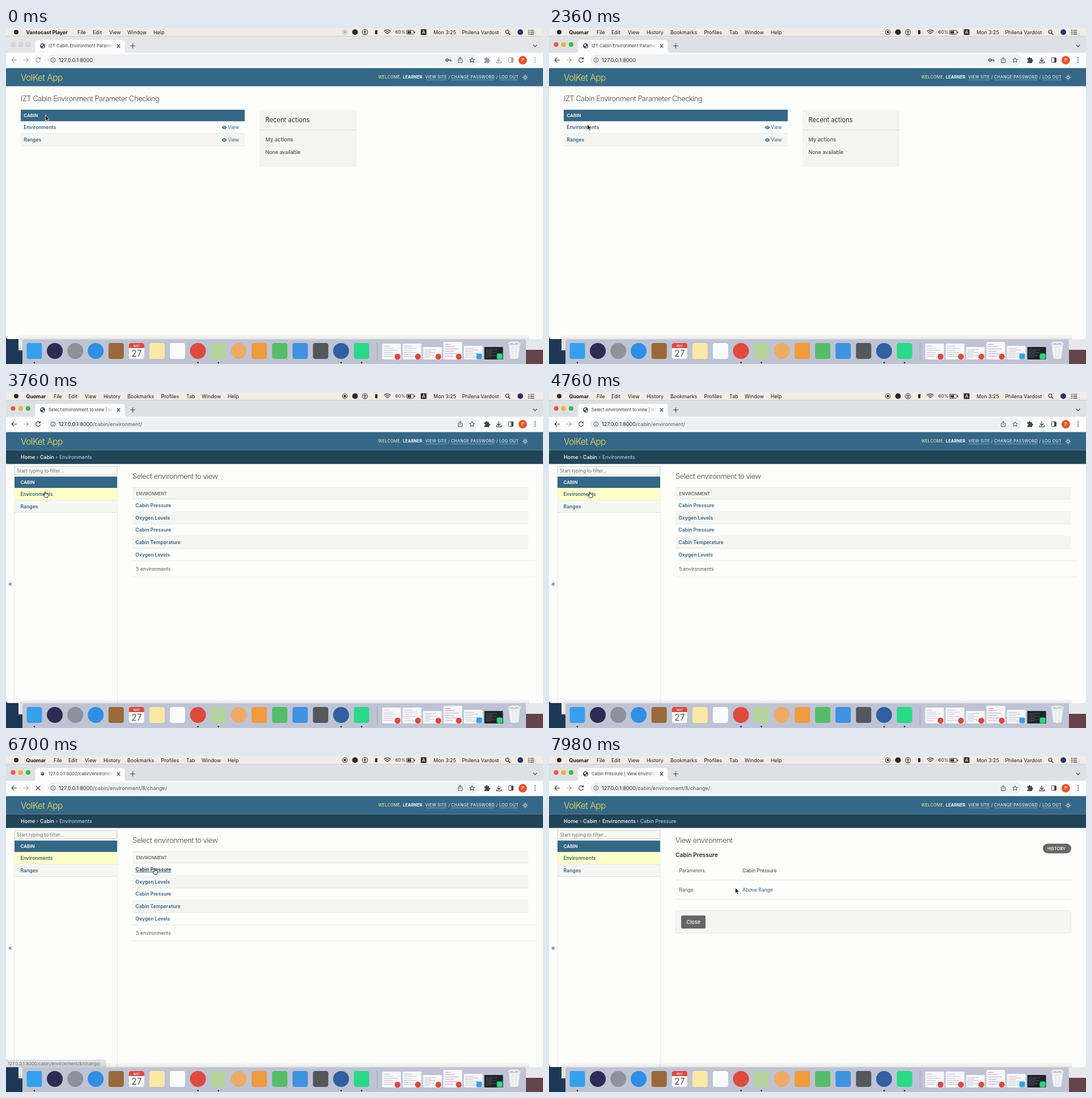
Recreate the animation shown at these times as an HTML page. Size 947 by 592 pixels, loop 8000 ms.

```html
<!DOCTYPE html>
<html lang="en">
<head>
<meta charset="utf-8">
<title>Cabin admin</title>
<style>
html, body { margin: 0; width: 100%; height: 100%; overflow: hidden; }
svg { display: block; width: 100vw; height: 100vh; font-family: Inter, Roboto, sans-serif; }
text { white-space: pre; }
</style>
</head>
<body>
<svg id="stage" viewBox="0 0 947 592"></svg>
<script>
const LOOP = 8000;
const MENU = 1250, FOCUS = 1600;                    // application, then window, comes to the front
const HOVER_LIST = 2600, CLICK_LIST = 2900, LIST = 3350;
const HOVER_ITEM = 5660, CLICK_ITEM = 6450, DETAIL = 7000;
const BLUE = '#356887', LINK = '#34627f', INK = '#333', RULE = '#e4e5e3', PALE = '#f5f6f4';

const rect = (x, y, w, h, fill, r = 0, extra = '') =>
  `<rect x="${x}" y="${y}" width="${w}" height="${h}" fill="${fill}" rx="${r}" ${extra}/>`;
const dot = (x, y, r, fill, extra = '') => `<circle cx="${x}" cy="${y}" r="${r}" fill="${fill}" ${extra}/>`;
const line = (d, color, w = 1) =>
  `<path d="${d}" fill="none" stroke="${color}" stroke-width="${w}" stroke-linecap="round" stroke-linejoin="round"/>`;
// y is the middle of the capitals
const text = (x, y, str, size, fill = INK, weight = 400, spacing = 0, extra = '') =>
  `<text x="${x}" y="${y + size * .36}" font-size="${size}" fill="${fill}" font-weight="${weight}" letter-spacing="${spacing}" ${extra}>${str}</text>`;
const during = (from, to, ...parts) => `<g data-from="${from}" data-to="${to}">${parts.join('')}</g>`;

function menuItems(app, items) {
  return text(35.5, 7.5, app, 8.9, '#1c1c1c', 700) +
    items.map(([x, label]) => text(x, 7.5, label, 8.9, '#1c1c1c')).join('');
}

function recordIcon(c) {
  return dot(597.5, 7.3, 4.3, 'none', `stroke="${c}" stroke-width="1"`) + rect(595.5, 5.3, 4, 4, c, .6);
}

function menuBar() {
  const c = '#2a2a2a';
  return rect(0, 0, 947, 15, '#f0ece8') + rect(0, 14.2, 947, .8, '#cbc9c8') +
    dot(18, 7.3, 4, c) +
    during(0, MENU, recordIcon('#aaa'), menuItems('Vantocast Player',
      [[126, 'File'], [153, 'Edit'], [182, 'View'], [214, 'Window'], [260, 'Help']])) +
    during(MENU, LOOP, recordIcon(c), menuItems('Quomar',
      [[84, 'File'], [110, 'Edit'], [139, 'View'], [172, 'History'], [214, 'Bookmarks'],
       [273.5, 'Profiles'], [318, 'Tab'], [345, 'Window'], [391, 'Help']])) +
    dot(615.5, 7.3, 5, c) +
    dot(633, 7.3, 4.7, 'none', `stroke="${c}"`) + dot(633, 4.8, .9, c) +
    line('M630.5 6.6h5M633 6.6v2l-1.5 2.4M633 8.6l1.5 2.4', c, .9) +
    rect(651, 4, 4, 7, c) +
    line('M667 5.6Q672.5 1 678 5.6M669 7.8Q672.5 4.8 676 7.8M671 9.8Q672.5 8.6 674 9.8', c, 1.3) +
    text(686.5, 7.5, '60%', 8.1, c) +
    rect(706.5, 4, 12.5, 7, 'none', 1.5, `stroke="${c}" stroke-width=".9"`) + rect(708, 5.5, 6, 4, c) +
    rect(720, 6, 1.3, 3, c) + line('M714 4.5L711.5 8h3L712 10.8', c, .9) +
    rect(731.5, 2.3, 10, 10, c, 1) + text(733.7, 7.5, 'A', 8, '#fff', 500) +
    text(754, 7.5, 'Mon 3:25', 8.9, '#1c1c1c') + text(804.5, 7.5, 'Philena Vardost', 8.8, '#1c1c1c') +
    dot(884, 6.5, 3, 'none', `stroke="${c}" stroke-width="1.1"`) + line('M886.4 8.9L889 11.6', c, 1.2) +
    dot(907, 7.3, 5, '#31336b') +
    line('M921 4h2M921 7.3h2M921 10.6h2M925 4h6M925 7.3h6M925 10.6h6', c, 1.2);
}

function trafficLights(colors) {
  return colors.map((c, i) => dot(12.5 + i * 13.2, 29, 4, c, 'stroke="#0002" stroke-width=".5"')).join('');
}

const reload = c => line('M60 54.2A4 4 0 1 0 60.4 57.8M60.4 52v2.6h-2.6', c, 1.2);
const stop = () => line('M53 53l7 7M60 53l-7 7', '#404348', 1.3);

function toolbarIcons(c) {
  return line('M18.5 56.5h-8.2M14 52.6l-3.9 3.9 3.9 3.9', c, 1.2) +
    `<path d="M843.5 53.3h2.5q0-2 1.6-2t1.6 2h2.8v2.8q2 0 2 1.5t-2 1.5v2.6h-8.5v-2.6q2 0 2-1.5t-2-1.5z" fill="${c}"/>` +
    line('M869 52v6.5M866 56l3 3 3-3M865 59v2.4h8.4V59', c, 1.2) +
    rect(886.3, 52.5, 8, 8, 'none', .8, `stroke="${c}" stroke-width="1"`) + rect(891, 52.5, 3.5, 8, c) +
    [52.7, 56.5, 60.3].map(y => dot(933, y, 1, c)).join('');
}

const tabTitle = str => text(75, 31.5, str, 7.7, '#3b3d42', 400, 0, 'clip-path="url(#tabClip)"');
const readyTab = str => dot(64.5, 31.5, 4.5, '#4a4d52') +
  '<path d="M61.5 30l2-1.6 2 1-1 2-1.8.6zM64.6 33l2-1 1 1-2 2z" fill="#fff"/>' + tabTitle(str);
const loadingTab = () => dot(64.5, 31.5, 3, '#55585d') + line('M62.4 30.2l2 1.2 1.6-1', '#fff', .8) +
  tabTitle('127.0.0.1:8000/cabin/environment');
const address = path => text(93, 56.6, `127.0.0.1:8000<tspan fill="#55585d">${path}</tspan>`, 9.1, '#26282c');

function browser() {
  const active = '#404348', idle = '#9b9da1';
  return rect(0, 15, 947, 30, '#dde1e5') +
    during(0, FOCUS, rect(0, 15, 947, 29, '#e4e6e9'), trafficLights(['#d5d7da', '#d5d7da', '#d5d7da'])) +
    during(FOCUS, LOOP, trafficLights(['#f4574e', '#f5b52e', '#35c13f'])) +
    '<path d="M46 44q5.5 0 5.5-5.5V26q0-5 5-5h148q5 0 5 5v12.5q0 5.5 5.5 5.5z" fill="#fcfcfc"/>' +
    rect(0, 43.5, 947, 27.5, '#fcfcfc') +
    during(0, CLICK_LIST, readyTab('IZT Cabin Environment Parameter')) +
    during(CLICK_LIST, LIST, loadingTab()) +
    during(LIST, CLICK_ITEM, readyTab('Select environment to view | VolKet')) +
    during(CLICK_ITEM, DETAIL, loadingTab()) +
    during(DETAIL, LOOP, readyTab('Cabin Pressure | View environment')) +
    rect(174, 25, 16, 13, 'url(#tabFade)') +
    line('M196 29l5 5M201 29l-5 5', '#44474c', 1.1) +
    line('M219.5 31.5h8M223.5 27.5v8', '#44474c', 1.1) +
    line('M930 30l3 3 3-3', '#44474c', 1.2) +
    during(0, FOCUS, toolbarIcons(idle), reload(idle)) +
    during(FOCUS, LOOP, toolbarIcons(active)) +
    during(FOCUS, CLICK_LIST, reload(active)) + during(CLICK_LIST, LIST, stop()) +
    during(LIST, CLICK_ITEM, reload(active)) + during(CLICK_ITEM, DETAIL, stop()) +
    during(DETAIL, LOOP, reload(active)) +
    line('M31 56.5h8.2M35.5 52.6l3.9 3.9-3.9 3.9', '#a4a6aa', 1.2) +
    rect(73, 46.5, 760, 20, '#eff0f2', 10) +
    dot(83, 56.5, 4, 'none', 'stroke="#505358" stroke-width="1"') + rect(82.5, 55.8, 1, 3, '#505358') + rect(82.5, 54, 1, 1, '#505358') +
    during(0, LIST, dot(777.7, 56.5, 2, 'none', `stroke="${active}" stroke-width="1.5"`),
      line('M780 56.5h4.5v1.7', active, 1.5)) +
    during(0, CLICK_LIST, address('')) +
    during(CLICK_LIST, CLICK_ITEM, address('/cabin/environment/')) +
    during(CLICK_ITEM, LOOP, address('/cabin/environment/8/change/')) +
    line('M799 55h-1.5v6h7v-6H803M801 58v-6M799 53.7l2-2 2 2', '#505358', 1) +
    '<path d="M822 52.2l1.3 2.9 3.2.3-2.4 2.1.7 3.1-2.8-1.6-2.8 1.6.7-3.1-2.4-2.1 3.2-.3z" fill="none" stroke="#505358"/>' +
    dot(911.3, 56.7, 7.5, '#e5562b') + text(908.9, 56.7, 'P', 7.5, '#fff');
}

function header() {
  const item = (x, str, w) => text(x, 86.5, str, 7.1, '#fff', 400, .3) + (w ? rect(x, 91, w, .6, '#a9c3d1') : '');
  const rays = Array.from({ length: 8 }, (_, i) => {
    const c = Math.cos(i * Math.PI / 4), s = Math.sin(i * Math.PI / 4);
    return `M${915.5 + 3.6 * c} ${87 + 3.6 * s}L${915.5 + 4.5 * c} ${87 + 4.5 * s}`;
  }).join('');
  return rect(0, 70.6, 947, 32, BLUE) +
    text(26, 87.3, 'VolKet App', 15.6, '#f3df58', 300, -.55) +
    text(656.5, 86.5, 'WELCOME,', 7.1, '#fbf3b4', 400, .3) + text(700, 86.5, 'LEARNER', 7.1, '#fff', 700, .2) +
    item(735, '.') + item(739.5, 'VIEW SITE', 38) + item(780, '/') + item(785, 'CHANGE PASSWORD', 77) +
    item(864.5, '/') + item(870, 'LOG OUT', 34) +
    dot(915.5, 87, 2.1, 'none', 'stroke="#fff" stroke-width="1"') + line(rays, '#fff', .9);
}

const title = (x, y, str) => text(x, y, str, 12.8, '#444', 300, -.4);
const bold = (x, y, str, color = LINK) => text(x, y, str, 8.6, color, 600);
const linkHint = (width, path) =>
  `<path d="M0 535.5h${width - 3}q3 0 3 3V548H0z" fill="#e0e2e6" stroke="#c8cace" stroke-width=".7"/>` +
  text(3, 541.8, '127.0.0.1:8000' + path, 7.8, '#666a70');

function home() {
  const view = y => `<path d="M380.5 ${y}q4.5-6 9 0q-4.5 6-9 0z" fill="#286394"/>` +
    dot(385, y, 1.7, '#fff') + dot(385, y, 1, '#286394') + text(391, y, 'View', 8.6, LINK);
  return title(26, 124, 'IZT Cabin Environment Parameter Checking') +
    rect(26, 144, 395, 20.3, BLUE) + text(31.3, 154.5, 'CABIN', 8, '#fff', 600) +
    bold(31.3, 175.3, 'Environments') + view(175.3) +
    rect(26, 186, 395, 22, PALE) + rect(26, 185.5, 395, .8, RULE) + rect(26, 207.5, 395, .8, RULE) +
    bold(31.3, 197.2, 'Ranges') + view(197.2) +
    rect(447, 144.5, 171, 100.5, '#f4f5f3') + text(457.5, 161.7, 'Recent actions', 11.2) +
    rect(447, 179, 171, .9, '#dcdddb') +
    text(457.5, 196.2, 'My actions', 9.2, '#666', 600) + text(457.5, 218.4, 'None available', 8.9) +
    during(HOVER_LIST, LIST, linkHint(142, '/cabin/environment/'));
}

function sidebar() {
  return rect(0, 102.6, 947, 24.2, '#204556') +
    text(26, 115.2, 'Home', 9, '#fff', 500) + text(54, 115, '›', 9, '#c5dbe5') +
    text(60, 115.2, 'Cabin', 9, '#fff', 500) + text(87.5, 115, '›', 9, '#c5dbe5') +
    rect(14.5, 127, .8, 421, RULE) + rect(195.8, 127, .8, 421, '#e0e0e0') +
    rect(15.5, 131.5, 180, 14, '#f9f9f8', 0, 'stroke="#ccc" stroke-width=".8"') +
    text(19, 138.5, 'Start typing to filter...', 8.4, '#707070') +
    rect(15, 149, 181, 20, BLUE) + text(25.5, 159, 'CABIN', 8, '#fff', 600) +
    rect(15, 169, 181, 21.5, '#ffffc8') + bold(25.5, 180, 'Environments') +
    rect(15, 190.5, 181, 22, PALE) + rect(15, 190.3, 181, .8, RULE) + rect(15, 212, 181, .8, '#dcdcdc') +
    bold(25.5, 201.8, 'Ranges') + text(4, 338, '«', 11, LINK, 500);
}

function list() {
  const rows = ['Cabin Pressure', 'Oxygen Levels', 'Cabin Pressure', 'Cabin Temperature', 'Oxygen Levels'];
  return text(94, 115.2, 'Environments', 9, '#c5dbe5') +
    title(223, 148, 'Select environment to view') +
    rect(223, 168, 698, 21, PALE) + rect(223, 167.8, 698, .8, RULE) + rect(223, 188.3, 698, .8, '#dfdfdf') +
    text(229.5, 179, 'ENVIRONMENT', 7.3, '#555', 500) +
    rows.map((name, i) => {
      const y = 189 + i * 21.7;
      return (i % 2 ? rect(223, y, 698, 21.7, PALE) : '') + rect(223, y + 21.3, 698, .8, RULE) +
        (i ? bold(228.3, y + 10.8, name) : '');
    }).join('') +
    rect(921, 297, 12, .8, RULE) + text(229.5, 312.2, '5 environments', 8.4, '#555') + rect(223, 325.5, 710, .8, RULE) +
    during(LIST, HOVER_ITEM, bold(228.3, 199.8, rows[0])) +
    during(HOVER_ITEM, DETAIL, bold(228.3, 199.8, rows[0], '#0b2c40'), rect(228.3, 204, 63, .8, '#0b2c40'),
      linkHint(176, '/cabin/environment/8/change/'));
}

function detail() {
  return text(94, 115.2, 'Environments', 9, '#fff', 500) + text(154.5, 115, '›', 9, '#c5dbe5') +
    text(160.7, 115.2, 'Cabin Pressure', 8.9, '#c5dbe5') +
    title(223, 148, 'View environment') + text(223, 174.7, 'Cabin Pressure', 10.2, '#2b2b2b', 600) +
    rect(871, 154.5, 50, 17, '#666', 8.5) + text(879, 163, 'HISTORY', 7.1, '#fff', 600, .1) +
    text(229.5, 202, 'Parameters:', 8.4, '#555') + text(341.3, 202, 'Cabin Pressure', 8.4) +
    rect(223, 218, 698, .8, RULE) +
    text(229.5, 235.8, 'Range:', 8.4, '#555') + text(341.3, 235.5, 'Above Range', 8.5, LINK) +
    rect(223, 252, 698, .8, '#ececec') +
    rect(223.4, 272.4, 697, 39.6, PALE, 2, 'stroke="#e0e0e0" stroke-width=".8"') +
    rect(233, 281, 43, 23, '#666', 2.7) + text(242.3, 292.8, 'Close', 9.2, '#fff', 500);
}

function desktop() {
  return rect(0, 540, 947, 52, '#1d3855') + rect(22, 540, 925, 28, '#e6e8eb') + rect(905, 567, 42, 25, '#664348') +
    '<path d="M0 103H947V543q0 5-5 5H5q-5 0-5-5z" fill="#fdfdfc"/>';
}

function dock() {
  const square = 'square', round = 'round';
  const icons = [[square, '#35a0ee'], [round, '#2c2c55'], [round, '#8b9299'], [round, '#2f8fe6'],
    [square, '#9a6937'], null, [square, '#fae9a4'], [square, '#fbfbfb'], [round, '#e04a3c'],
    [square, '#b4d49c'], [round, '#efab66'], [square, '#f09b3c'], [square, '#55bd68'],
    [square, '#3e92e2'], [square, '#54585c'], [round, '#2f609f'], [square, '#28d987']];
  const icon = (x, [kind, c]) => kind === round ? dot(x, 569, 14, c) : rect(x - 13.5, 555, 27, 28, c, 4);
  const calendar = x => rect(x - 13.5, 555, 27, 28, '#fdfdfd', 4) +
    `<path d="M${x - 13.5} 564v-5q0-4 4-4h19q4 0 4 4v5z" fill="#e2483d"/>` +
    text(x, 559.7, 'MAY', 5, '#fff', 500, 0, 'text-anchor="middle"') +
    text(x, 573, '27', 16, '#333', 300, 0, 'text-anchor="middle"');
  const thumb = (x, i) => {
    const dark = i === 5, h = [28, 28, 22, 31, 24, 22][i], y = 584 - h;
    const lines = Array.from({ length: 6 }, (_, k) =>
      rect(x - 14, y + 4 + k * (h - 6) / 6, 10 + (k * 7 + i * 5) % 15, .8, dark ? '#59616b' : i === 3 ? '#b58bc4' : '#b5b8be')).join('');
    return rect(x - 16.5, y, 33, h, dark ? '#20242a' : '#f8f8fa', 1) + lines +
      (i < 4 ? dot(x + 10.5, 579, 5.2, '#e04a3c') : rect(x + 5.5, 573.5, 10, 10, dark ? '#28d987' : '#35a0ee', 2));
  };
  return rect(24, 540, 898, 9, 'url(#dockShade)') +
    '<path d="M29 592V553q0-5 5-5H912q5 0 5 5v39z" fill="#bec4d4"/>' + rect(32, 548, 882, .7, '#d5d9e3') +
    icons.map((spec, i) => spec ? icon(50 + i * 36.06, spec) : calendar(50 + i * 36.06)).join('') +
    rect(654, 554, .8, 32, '#959bab') +
    Array.from({ length: 6 }, (_, i) => thumb(680 + i * 36, i)).join('') +
    '<path d="M885.5 555h22l-3 27.5q-8 2.5-16 0z" fill="#e9ebed" stroke="#b3b6ba" stroke-width=".8"/>' +
    '<ellipse cx="896.5" cy="556" rx="11.5" ry="3" fill="#c6c9cd" stroke="#f5f5f5"/>' +
    line('M888 556l4-2.5 4 2 5-2.5 4 3M890 562l2 19M896.5 563v19M903 562l-2 19', '#fff', 1.2) +
    [50, 338.5, 374.6, 591, 627].map(x => dot(x, 589.6, 1.3, '#222')).join('');
}

const defs = `<defs><clipPath id="tabClip"><rect x="74" y="22" width="115.5" height="18"/></clipPath>
  <linearGradient id="tabFade"><stop stop-color="#fcfcfc" stop-opacity="0"/><stop offset="1" stop-color="#fcfcfc"/></linearGradient>
  <linearGradient id="dockShade" x2="0" y2="1"><stop stop-opacity="0"/><stop offset="1" stop-opacity=".1"/></linearGradient></defs>`;

const pointer = `<g id="cursor">
  <path id="arrow" d="M0 0V10.2L2.4 8 4 11.6 5.7 10.9 4.1 7.4H7.2Z" fill="#111" stroke="#fff" stroke-width=".8"/>
  <path id="hand" transform="scale(.9)" d="M-1 1Q0-.6 1 1V4.2Q2.3 3.6 2.9 4.6 4.2 4.1 4.6 5.1 6.2 4.9 6.2 6.5L5.6 9.2 4.8 11.5H-.4L-3.3 7.3Q-3.7 5.7-2.2 6L-1 7.3Z"
    fill="#fff" stroke="#111" stroke-width="1" stroke-linejoin="round"/></g>`;

const stage = document.getElementById('stage');
stage.innerHTML = defs + desktop() + menuBar() + browser() + header() +
  during(0, LIST, home()) + during(LIST, LOOP, sidebar()) +
  during(LIST, DETAIL, list()) + during(DETAIL, LOOP, detail()) + dock() + pointer;

const scenes = [...stage.querySelectorAll('[data-from]')].map(el => ({ el, from: +el.dataset.from, to: +el.dataset.to }));
const [cursor, arrow, hand] = ['cursor', 'arrow', 'hand'].map(id => document.getElementById(id));

// time, x, y
const path = [[0, 69.5, 153.5], [150, 69.5, 153.5], [800, 67.5, 169.5], [2380, 67.5, 169.5], [2620, 69, 175.5],
  [4700, 69, 175.5], [5540, 263, 202], [5700, 263, 202], [6000, 262, 198], [7000, 262, 198], [7500, 328.5, 232], [LOOP, 328.5, 232]];
const handTimes = [[HOVER_LIST - 60, 4800], [HOVER_ITEM - 120, DETAIL + 80]];
const show = (el, on) => { el.style.display = on ? '' : 'none'; };

function render(now) {
  const t = now % LOOP;
  for (const s of scenes) show(s.el, t >= s.from && t < s.to);
  const i = path.findIndex(p => p[0] > t);
  const [t0, x0, y0] = path[i - 1], [t1, x1, y1] = path[i];
  const u = (t - t0) / (t1 - t0), k = u * u * (3 - 2 * u);
  cursor.setAttribute('transform', `translate(${x0 + (x1 - x0) * k} ${y0 + (y1 - y0) * k})`);
  const isHand = handTimes.some(([a, b]) => t >= a && t < b);
  show(hand, isHand);
  show(arrow, !isHand);
}

const start = performance.now();
function tick() {
  render(performance.now() - start);
  requestAnimationFrame(tick);
}
tick();
</script>
</body>
</html>
```
